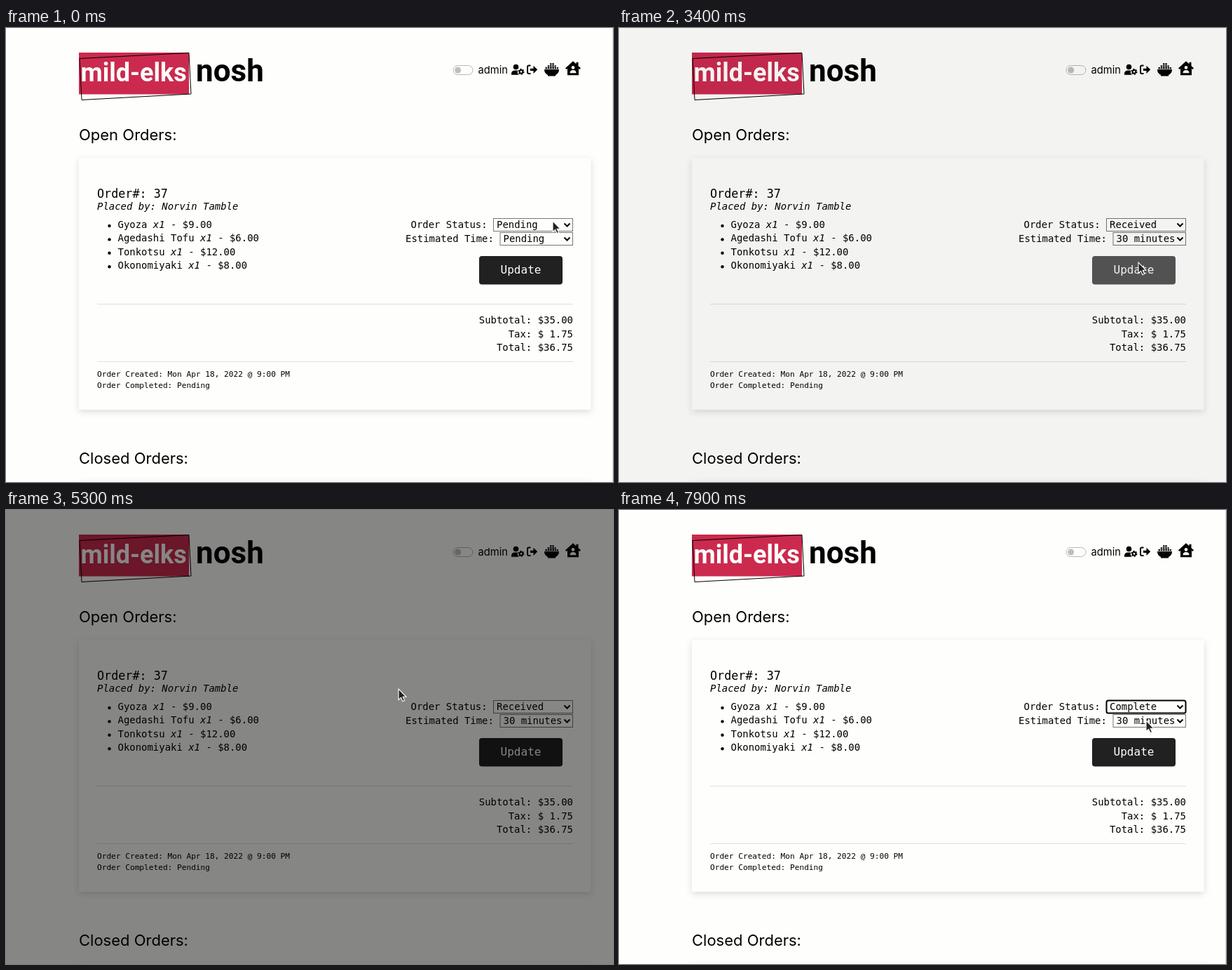
An HTML page for the animation above (8 s loop, 866x647 px).

```html
<!DOCTYPE html>
<html lang="en">
<head>
<meta charset="utf-8">
<title>Open orders</title>
<style>
  html, body { margin: 0; width: 100%; height: 100%; overflow: hidden; background: #fefefc; }
  svg { display: block; width: 100vw; height: 100vh; }
  text { font: 14.75px Inter, sans-serif; white-space: pre; }
  .logo { font: bold 36px Roboto, sans-serif; }
  .logo.big { font-size: 44px; }
  .h4 { font-size: 22px; }
  .h5 { font-size: 18.44px; }
  .mono text { font: 13.95px "DejaVu Sans Mono", monospace; }
  .mono .large { font-size: 16.75px; }
  .mono .small { font-size: 11.15px; }
  .mono .button { font-size: 16px; }
  .mono .i { font-style: italic; }
  .end { text-anchor: end; }
  .paper { fill: #fefefc; }
  .line { fill: none; stroke: #000; }
  .shadow { filter: drop-shadow(0 3px 5px rgba(0, 0, 0, .13)); }
  .popup { filter: drop-shadow(0 2px 4px rgba(0, 0, 0, .3)); }
</style>
</head>
<body>
<svg viewBox="0 0 866 647" xmlns="http://www.w3.org/2000/svg">
  <rect class="paper" width="866" height="647"/>
  <rect id="scrollbar" x="865" width="1" height="647" fill="#dcdcda"/>

  <!-- Header -->
  <rect x="104" y="35" width="157" height="59.5" fill="#cb2a4e"/>
  <path class="line" d="M105 43.5L261 35.5L264 94L108 102.5Z"/>
  <text class="logo" x="106.5" y="76" fill="#fefefc">mild-elks</text>
  <text class="logo big" x="271" y="76">nosh</text>
  <rect x="638" y="53.5" width="28" height="13" rx="6.5" fill="none" stroke="#b8b8b8"/>
  <circle cx="644.7" cy="60" r="4.5" fill="#bfbfbf"/>
  <text x="673.5" y="65">admin</text>
  <g>
    <circle cx="727.5" cy="55.5" r="3.8"/>
    <path d="M721 66.8V65a4.6 4.6 0 0 1 4.6-4.6h4.6q-1.4 3.6 1.6 6.4Z"/>
    <circle class="line" cx="735" cy="62.3" r="2.4" stroke-width="2"/>
    <circle class="line" cx="735" cy="62.3" r="3.8" stroke-width="1.4" stroke-dasharray="2 1.98"/>
    <path class="line" d="M748.5 53.5h-2.5a2 2 0 0 0-2 2v7.5a2 2 0 0 0 2 2h2.5" stroke-width="2"/>
    <path d="M748 57.7h4.5v-4l5.7 5.6-5.7 5.6v-4H748Z"/>
    <path d="M768 59h21q0 5.5-5 8v1.5h-11v-1.5q-5-2.5-5-8Z"/>
    <path class="line" d="M776 51.3h6M772.7 54.3h12M769.5 57.2h18.5"
      stroke-width="2.3" stroke-dasharray="2.5 .8"/>
  </g>
  <g transform="translate(0 -.8)">
    <path d="M809 48l4.5 4v-2.5h3v5.2l3.5 3.3-1.5 1.8-1.5-1.2V68h-16v-9.4l-1.5 1.2-1.5-1.8Z"/>
    <circle class="paper" cx="809" cy="57.2" r="2.3"/>
    <path class="paper" d="M804.5 65q0-4.3 4.5-4.3t4.5 4.3Z"/>
  </g>

  <!-- Order card -->
  <text class="h4" x="104" y="160">Open Orders:</text>
  <rect class="paper shadow" x="104" y="185" width="730.5" height="359"/>
  <text class="h4" x="104" y="620.5">Closed Orders:</text>
  <rect class="paper shadow" x="104" y="646" width="730.5" height="60"/>
  <g class="mono">
    <text class="large" x="130" y="242">Order#: 37</text>
    <text class="i" x="130" y="259">Placed by: Norvin Tamble</text>
    <g id="items"></g>
    <text x="577.5" y="285">Order Status:</text>
    <text x="570" y="304.5">Estimated Time:</text>
    <path class="line" d="M130 393.5H809M130 475.5H809" style="stroke:#e0e0de"/>
    <text class="end" x="809" y="421">Subtotal: $35.00</text>
    <text class="end" x="809" y="440.5">Tax: $ 1.75</text>
    <text class="end" x="809" y="460">Total: $36.75</text>
    <text class="small" x="130" y="497">Order Created: Mon Apr 18, 2022 @ 9:00 PM</text>
    <text class="small" x="130" y="513">Order Completed: Pending</text>
    <rect id="button" x="675" y="325" width="119" height="40.5" rx="4"/>
    <text class="button" x="734.5" y="350" text-anchor="middle" fill="#fefefc">Update</text>
    <g id="selects"></g>
  </g>

  <!-- Dialog -->
  <rect id="backdrop" width="866" height="647"/>
  <g id="modal">
    <rect class="paper" x="202.5" y="26" width="460" height="132" rx="4.5" stroke="#000" stroke-opacity=".2"/>
    <path class="line" d="M203 53H662" style="stroke:#dee2e6"/>
    <text class="h5" x="217" y="88.5">This order has been updated.</text>
    <text x="217" y="114.5">A text message will be sent to the customer shortly informing</text>
    <text x="217" y="132">them of their order status.</text>
  </g>
  <path id="cursor" d="M0 0V15.5L3.6 12.3L6 17.7L8.600 16.5L6.2 11.3H11Z" fill="#222" stroke="#fff" stroke-width="1.1"/>
</svg>

<script>
const $ = id => document.getElementById(id);
const LOOP = 8000, STEP = 100, ROW = 16.4;
const clamp = (v, lo = 0, hi = 1) => Math.min(hi, Math.max(lo, v));
const ramp = (t, start, length) => clamp((t - start) / length);
const easeOut = p => 1 - (1 - p) ** 1.7;

const statuses = ["Pending", "Received", "In-Progress", "Ready", "Complete"];
const minutes = ["Pending", ...[5, 10, 15, 20, 25, 30].map(n => n + " minutes")];

const items = [["Gyoza", 9], ["Agedashi Tofu", 6], ["Tonkotsu", 12], ["Okonomiyaki", 8]];
$("items").innerHTML = items.map(([name, price], i) => {
  const y = 285 + i * 19.4;
  return `<circle cx="147.5" cy="${y - 3}" r="2.2"/>
    <text x="159.5" y="${y}">${name} <tspan class="i">x1</tspan> - $${price}.00</text>`;
}).join("");

// Cursor tip: time, x, y
const path = [
  [0, 780, 275], [600, 780, 275], [800, 779, 290], [900, 779, 290],
  [1000, 779, 307], [1200, 778, 326], [1400, 778, 318], [1700, 778, 318],
  [1900, 764, 312], [2000, 764, 312], [2100, 762, 306], [2300, 762, 306],
  [2700, 757, 418], [2900, 757, 418], [3300, 741, 334], [3900, 741, 334],
  [4200, 420, 18], [4400, 146, 70], [4800, 564, 254], [5100, 563, 254],
  [5300, 560, 255], [5900, 749, 282], [6600, 749, 282], [7500, 752, 358],
  [7700, 752, 358], [7800, 752, 343], [7900, 752, 300], [LOOP, 752, 300]
];

function cursorAt(t) {
  const i = path.findIndex(key => key[0] > t);
  const [t0, x0, y0] = path[i - 1], [t1, x1, y1] = path[i];
  const p = (t - t0) / (t1 - t0);
  return [x0 + (x1 - x0) * p, y0 + (y1 - y0) * p];
}

function selectBox(x, y, value, focused) {
  const frame = focused ? 'stroke="#000" stroke-width="2" rx="2.5"' : 'stroke="#767676"';
  return `<rect class="paper" x="${x}" y="${y}" width="${808.5 - x}" height="18" ${frame}/>
    <text x="${x + 4.5}" y="${y + 13.5}">${value}</text>
    <path class="line" d="M796.5 ${y + 7}l4 4 4-4" stroke-width="2"/>`;
}

function popup(x, y, options, active, blank) {
  const width = 808.5 - x, height = options.length * ROW + 2;
  const rows = options.map((label, i) => {
    const top = y + 1 + i * ROW, on = i === active;
    return (on ? `<rect x="${x + .5}" y="${top}" width="${width - 1}" height="${ROW}" fill="#c04a28"/>` : "") +
      `<text x="${x + 4.5}" y="${top + 12.3}" fill="${on ? "#fff" : "#000"}">${label}</text>`;
  }).join("");
  return `<rect class="popup" x="${x}" y="${y}" width="${width}" height="${height}"
    fill="${blank ? "#3c3d3c" : "#fefefc"}" stroke="#666"/>` + (blank ? "" : rows);
}

function render(t) {
  const [x, y] = cursorAt(t);
  const within = (a, b) => t >= a && t < b;
  const statusOpen = within(500, 1700) || within(6400, 7600);
  const timeOpen = within(2300, 2800);
  const status = t < 1700 ? 0 : t < 7600 ? 1 : 4;
  const time = t < 2800 ? 0 : 6;
  const activeRow = (top, options, selected) =>
    y < top ? selected : clamp(Math.floor((y - top) / ROW), 0, options.length - 1);

  $("selects").innerHTML =
    selectBox(705, 291.5, minutes[time], within(2800, 3400)) +
    selectBox(695.5, 271.5, statuses[status], within(1700, 2300) || t >= 7600) +
    (statusOpen ? popup(695.5, 289.5, statuses, activeRow(290.5, statuses, status), within(6400, 6500)) : "") +
    (timeOpen ? popup(705, 309.5, minutes, activeRow(310.5, minutes, time)) : "");

  const hover = !statusOpen && !timeOpen && x > 675 && x < 794 && y > 325 && y < 365;
  $("button").setAttribute("fill", hover ? "#565656" : "#212121");

  $("scrollbar").setAttribute("opacity", within(3400, 5400) ? 0 : 1);
  $("backdrop").setAttribute("opacity", .5 * (ramp(t, 3387, 150) - ramp(t, 5292, 150)));
  const slide = easeOut(ramp(t, 3574, 300)) - easeOut(ramp(t, 5130, 300));
  $("modal").setAttribute("opacity", ramp(t, 3581, 150) - ramp(t, 5130, 150));
  $("modal").setAttribute("transform", `translate(0 ${-46 * (1 - slide)})`);
  $("cursor").setAttribute("transform", `translate(${x} ${y})`);
}

// The screen advances ten times a second.
let shown = -1;
function tick() {
  const t = Math.floor(performance.now() % LOOP / STEP) * STEP;
  if (t !== shown) render(shown = t);
  requestAnimationFrame(tick);
}
tick();
</script>
</body>
</html>
```
